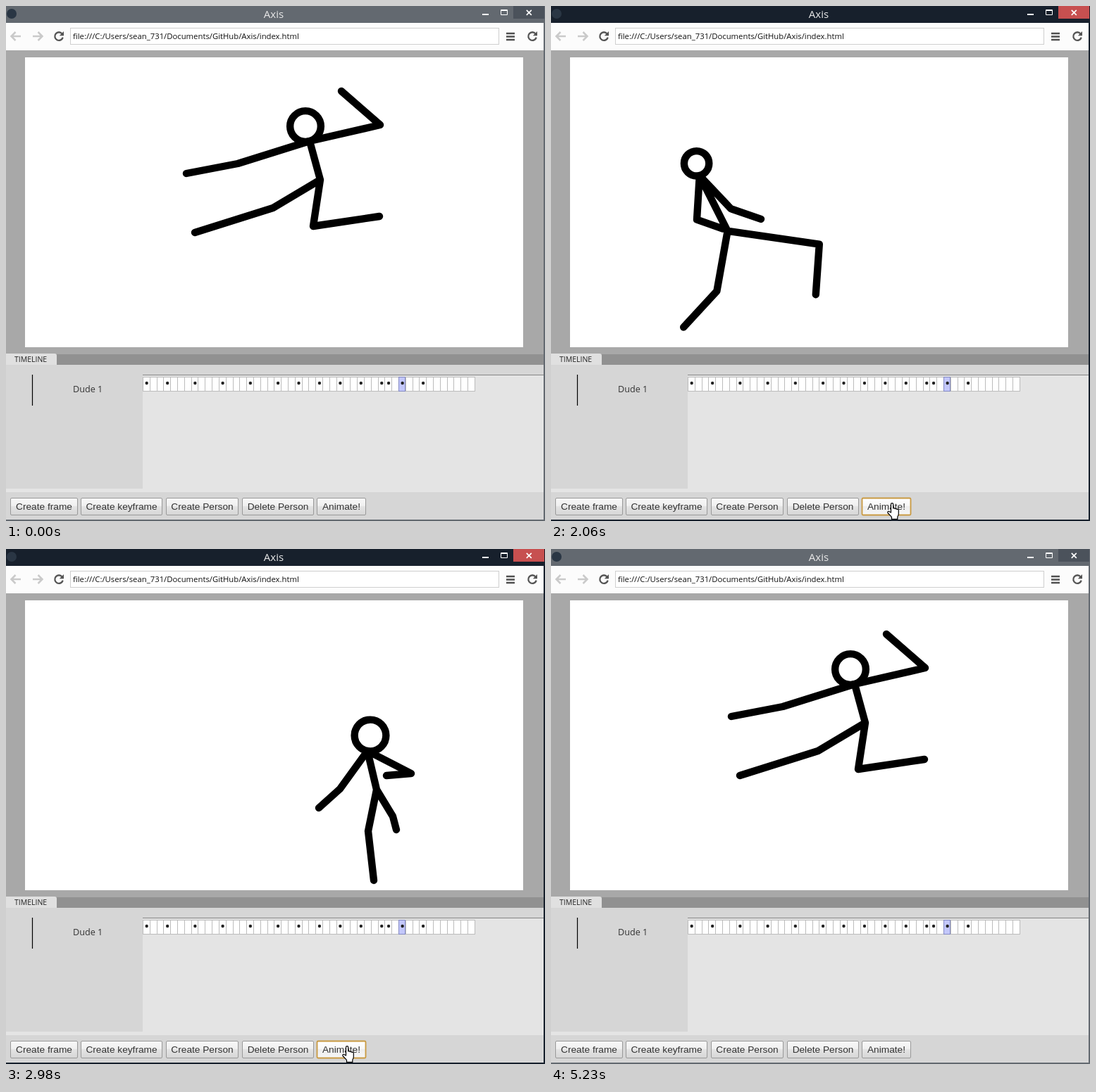
An HTML page that plays this animation: 765 px wide and 732 px high, repeating every 5330 ms.

```html
<!DOCTYPE html>
<html lang="en">
<head>
<meta charset="utf-8">
<title>Axis</title>
<style>
html, body { margin: 0; width: 100%; height: 100%; overflow: hidden; background: #d6d6d6; }
svg { display: block; --frame: #636970; --close: #4b525b; }
.ui { font-family: "Open Sans", sans-serif; }
.button text { font: 13.7px "Liberation Sans", Arial, sans-serif; fill: #333; }
.frame { fill: var(--frame); }
.limb { fill: none; stroke: #000; stroke-width: 10.4; stroke-linecap: round; stroke-linejoin: round; }
.cursor { fill: #fff; stroke: #000; stroke-width: 1.2; stroke-linejoin: round; }
</style>
</head>
<body>
<svg id="stage" width="765" height="732" viewBox="0 0 765 732">
  <defs>
    <linearGradient id="face" x2="0" y2="1">
      <stop offset="0" stop-color="#f8f8f8"/><stop offset=".45" stop-color="#f0f0f0"/>
      <stop offset=".5" stop-color="#e4e4e4"/><stop offset="1" stop-color="#d6d6d6"/>
    </linearGradient>
    <linearGradient id="lit" x2="0" y2="1">
      <stop offset="0" stop-color="#fff"/><stop offset=".45" stop-color="#f8f8f8"/>
      <stop offset=".5" stop-color="#eee"/><stop offset="1" stop-color="#f6f6f6"/>
    </linearGradient>
    <g id="reload">
      <path d="M4.6 -3.6A5.8 5.8 0 1 0 5.7 1.6" fill="none" stroke="#555" stroke-width="2.3"/>
      <path d="M7 -7V-.8H.8z" fill="#555"/>
    </g>
    <path id="arrow" d="M-7 0H7M-.5 -6L-6.5 0L-.5 6" fill="none" stroke="#cacaca" stroke-width="2.5"/>
  </defs>

  <rect class="frame" width="765" height="732"/>
  <rect x="720" width="44" height="18" fill="var(--close)"/>
  <circle cx="8" cy="11" r="7" fill="#2a3644"/>
  <text class="ui" x="380" y="17" font-size="15" text-anchor="middle" fill="#e8e8e8">Axis</text>
  <g fill="none" stroke="#fff">
    <path d="M676 12H685" stroke-width="2"/>
    <path d="M702.5 5.5H711.5V12.5H702.5zM702 6.5H712"/>
    <path d="M738.8 5.8L745.8 12.8M745.8 5.8L738.8 12.8" stroke-width="1.7"/>
  </g>

  <rect y="24" width="763" height="39" fill="#fcfcfc"/>
  <use href="#arrow" x="14" y="43"/>
  <use href="#arrow" transform="translate(45 43) scale(-1 1)"/>
  <use href="#reload" x="75" y="43"/>
  <use href="#reload" x="747" y="43"/>
  <path d="M710 39H722M710 43.5H722M710 48H722" stroke="#505050" stroke-width="2.6"/>
  <rect x="91.5" y="31.5" width="608" height="23" fill="#fff" stroke="#cfcfcf"/>
  <text class="ui" x="95" y="47" font-size="11.3" fill="#111">file:///C:/Users/sean_731/Documents/GitHub/Axis/index.html</text>

  <rect y="63" width="763" height="432" fill="#a8a8a8"/>
  <rect x="27" y="73" width="707" height="412" fill="#fff"/>
  <g>
    <path id="body" class="limb"/>
    <circle id="head" class="limb"/>
  </g>

  <rect y="495" width="763" height="15" fill="#919191"/>
  <rect y="510" width="763" height="220" fill="#d6d6d6"/>
  <path d="M0 494H69Q72 494 72 497V510H0z" fill="#e0e0e0"/>
  <text class="ui" x="12" y="506" font-size="10.5" fill="#222">TIMELINE</text>
  <path d="M194 525H763V691H0V686H194z" fill="#e4e4e4"/>
  <path d="M194 524.5H763" stroke="#858585"/>
  <path d="M37.5 524V568" stroke="#000" stroke-width="1.2"/>
  <text class="ui" x="95" y="549" font-size="12.6" fill="#333">Dude 1</text>
  <g id="cells"></g>
  <g id="buttons"></g>
  <path id="pointer" class="cursor" d="M.6 .6V16L4.2 12.6L6.5 18.2L9 17.1L6.7 11.7H11.4z"/>
  <path id="hand" class="cursor" d="M-.5 14V2.2a1.6 1.6 0 0 1 3.2 0V8q1.6 -1 2.6 .6q1.6 -.8 2.4 .7q2.6 -.6 2.6 1.7v5q0 2 -1.5 4v3.4H.5v-3L-5 14.5Q-5.5 11.6 -3 12.4z"/>
</svg>
<script>
const LOOP = 5330;
const $ = id => document.getElementById(id);
const lerp = (a, b, k) => a + (b - a) * k;

function add(parent, tag, attrs, text) {
  const el = document.createElementNS("http://www.w3.org/2000/svg", tag);
  for (const name in attrs) el.setAttribute(name, attrs[name]);
  if (text) el.textContent = text;
  return parent.appendChild(el);
}

// Timeline cells
const CELL = 9.81, SELECTED = 37;
const marks = [0, 3, 7, 11, 15, 19, 22, 25, 28, 31, 34, 35, 37, 40];
const cell = (i, fill, stroke) => add($("cells"), "rect",
  { x: Math.round(194 + i * CELL) + .5, y: 527.5, width: 10, height: 20, fill, stroke });
for (let i = 0; i < 48; i++) cell(i, "#fff", "#bcbcbc");
cell(SELECTED, "#c3c7fa", "#858bc4").setAttribute("width", 9);
for (const i of marks) add($("cells"), "circle", { cx: 199.7 + i * CELL, cy: 536, r: 2.2, fill: "#222" });

// Buttons
const labels = [["Create frame", 6, 102], ["Create keyframe", 106, 222], ["Create Person", 227, 330],
  ["Delete Person", 335, 437], ["Animate!", 441, 511]];
const faces = labels.map(([label, left, right]) => {
  const g = add($("buttons"), "g", { class: "button" });
  const face = add(g, "rect", { x: left + .5, y: 699.5, width: right - left - 1, height: 24, rx: 1.5,
    fill: "url(#face)", stroke: "#999" });
  add(g, "text", { x: (left + right) / 2, y: 716, "text-anchor": "middle" }, label);
  return face;
});
const play = faces[4];

// Joints: head, neck, hip, elbow, hand, elbow, hand, knee, foot, knee, foot
const stand = [100,240, 100,262, 100,340, 125,300, 130,340, 78,300, 72,340, 112,405, 116,468, 90,405, 84,468];
const lean = [89,192, 92,214, 136,315, 34,239, 76,256, 60,264, 104,277, 184,260, 179,331, 155,401, 130,468];
const lunge = [285,245, 290,259, 327,323, 403,321, 446,334, 305,330, 337,343, 512,391, 507,463, 289,408, 227,449];
const dash = [600,199, 596,221, 588,300, 640,262, 676,225, 548,262, 520,300, 640,350, 650,430, 560,385, 530,474];
const turn = [517,265, 513,287, 526,342, 575,319, 540,322, 474,341, 444,368, 549,380, 554,399, 514,401, 522,471];
const leap = [425,171, 431,192, 446,247, 531,169, 476,121, 329,224, 256,238, 436,313, 530,299, 379,287, 268,322];
// The lunge stretched back from its front knee
const crouch = lunge.map((v, i) => i % 2 ? v : 512 - (512 - v) * 4 / 3);
const keys = [[0, stand], [7, lean], [17, lunge], [19, crouch], [24, dash], [30, turn], [34, leap]];

function poseAt(step) {
  const n = keys.findIndex(key => key[0] >= step);
  if (n === 0) return keys[0][1];
  const [a, from] = keys[n - 1], [b, to] = keys[n];
  return from.map((v, i) => lerp(v, to[i], (step - a) / (b - a)));
}

// Index of the step reached within n even steps from a to b
const stepIn = (t, a, b, n) => Math.max(0, Math.min(n - 1, Math.floor((t - a) / (b - a) * (n - 1) + .1)));

const runs = [[1290, 1670, 7], [1730, 2220, 10], [2270, 2800, 11], [2860, 3230, 7]];
function figureStep(t) {
  if (t < runs[0][0]) return 34;
  let done = 0, step = 0;
  for (const [a, b, n] of runs) {
    if (t >= a) step = done + stepIn(t, a, b, n);
    done += n;
  }
  return step;
}

function drawFigure(t) {
  const p = poseAt(figureStep(t));
  const at = j => p[2 * j].toFixed(1) + " " + p[2 * j + 1].toFixed(1);
  const line = (...joints) => "M" + joints.map(at).join("L");
  $("body").setAttribute("d", line(1, 2) + line(1, 3, 4) + line(1, 5, 6) + line(2, 7, 8) + line(2, 9, 10));
  const head = $("head");
  head.setAttribute("cx", p[0]);
  head.setAttribute("cy", p[1]);
  head.setAttribute("r", Math.hypot(p[2] - p[0], p[3] - p[1]));
}

function cursorAt(t) {
  if (t < 250 || t >= 4500) return null;
  if (t < 850) {
    const k = stepIn(t, 250, 780, 10) / 9, ease = 1 - (1 - k) ** 2;
    return [lerp(541, 484, ease), lerp(685, 704, ease)];
  }
  if (t < 3910) return [483, 705.5];
  const k = stepIn(t, 3910, 4440, 10) / 9;
  return [lerp(484, 711, 1 - (1 - k) ** 2), 706.5 - 90 * k + 113 * k * k];
}

function place(el, pos) {
  el.style.display = pos ? "" : "none";
  if (pos) el.setAttribute("transform", `translate(${pos.map(Math.round).join(" ")})`);
}

function drawWindow(t) {
  const pos = cursorAt(t);
  const hover = pos && pos[0] >= 441 && pos[0] < 511 && pos[1] >= 699 && pos[1] < 724;
  place($("hand"), hover ? pos : null);
  place($("pointer"), hover ? null : pos);

  const focus = t >= 1170 && t < 5160;
  play.setAttribute("fill", hover ? "url(#lit)" : "url(#face)");
  play.setAttribute("stroke", focus ? "#c99a42" : hover ? "#777" : "#999");
  play.setAttribute("stroke-width", focus ? 1.8 : 1);

  const [frame, close] = focus ? ["#17202c", "#c75050"]
    : t >= 5160 && t < 5230 ? ["#3d454e", "#895056"] : ["#636970", "#4b525b"];
  $("stage").style.setProperty("--frame", frame);
  $("stage").style.setProperty("--close", close);
}

const start = performance.now();
function draw() {
  const t = (performance.now() - start) % LOOP;
  drawFigure(t);
  drawWindow(t);
  requestAnimationFrame(draw);
}
draw();
</script>
</body>
</html>
```
